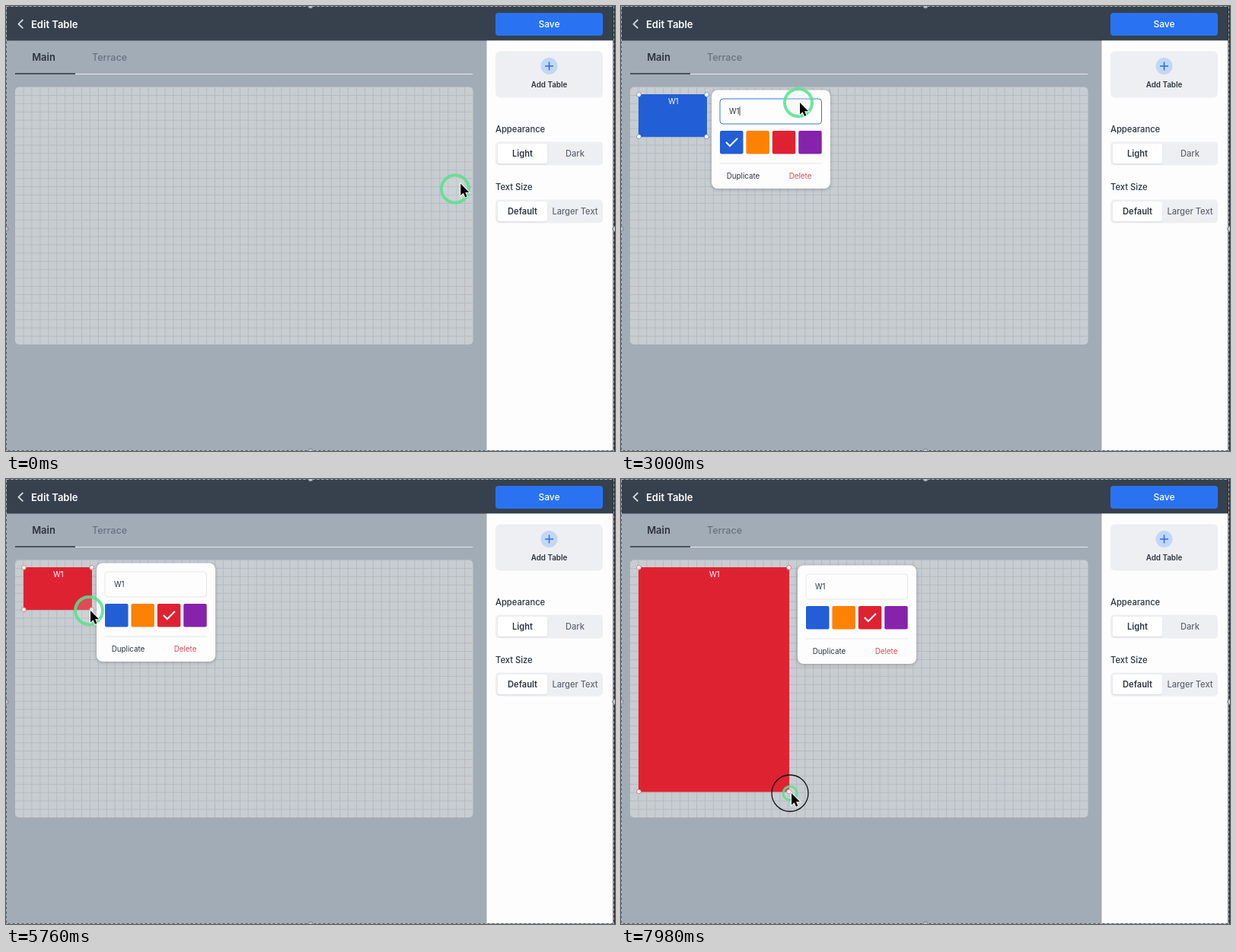
An HTML page with a canvas for the animation above (8000 ms loop, 800 by 585 pixels).

```html
<!DOCTYPE html>
<html lang="en">
<head>
<meta charset="utf-8">
<title>Edit Table</title>
<style>
html, body { margin: 0; width: 100%; height: 100%; overflow: hidden; }
canvas { display: block; width: 800px; height: 585px; }
</style>
</head>
<body>
<canvas id="stage" width="800" height="585"></canvas>
<script>
const stage = document.getElementById('stage').getContext('2d');
const layer = new OffscreenCanvas(160 + 16, 130 + 16).getContext('2d');
let ctx = stage;

const LOOP = 8000;
const BLUE = '#225ed5', ORANGE = '#fd8204', RED = '#df2232', PURPLE = '#8722ac';
const INK = '#2c333e', PALE = '#eeeff2', WHITE = '#fdfdfd';
const ARROW = new Path2D('M0 0V15.5L3.6 12.2L6 17.8L8.4 16.8L6.1 11.3H11Z');

const ADDED = 720, FOCUSED = 1860, CLEARED = 2040, RECOLORED = 4320, DRAGGED = 6000;
const clicks = [620, 1840, 4260];

const move = (from, to, x, y) => ({ from, to, x, y });
const pointerStart = { x: 581.7, y: 254 };
const pointerMoves = [
  move(-150, 560, 715, 79),        // Add Table
  move(800, 1220, 399, 170.6),
  move(1220, 1700, 235, 127),      // name field
  move(3480, 3900, 217, 170),      // red swatch
  move(4700, 5400, 111, 173),      // table corner
  move(DRAGGED, 6530, 236, 402),   // drag, overshoot, settle
  move(6530, 6850, 238, 426),
  move(6850, 7200, 224, 413)
];
const sizeStart = { x: 10, y: 6 };  // in snap steps
const sizeMoves = [move(DRAGGED + 40, 6480, 21, 30), move(6700, 7200, 22, 32)];

const clamp = v => Math.max(0, Math.min(1, v));
const ramp = (t, from, to) => clamp((t - from) / (to - from));

function travel(start, moves, t) {
  let { x, y } = start;
  for (const m of moves) {
    const u = ramp(t, m.from, m.to), eased = u * u * (3 - 2 * u);
    x += (m.x - x) * eased;
    y += (m.y - y) * eased;
  }
  return { x, y };
}

function box(x, y, w, h, r, fill, stroke) {
  ctx.beginPath();
  ctx.roundRect(x, y, w, h, r);
  ctx.fillStyle = fill;
  ctx.fill();
  if (stroke) { ctx.strokeStyle = stroke; ctx.lineWidth = 1; ctx.stroke(); }
}

function disc(x, y, r, fill, stroke, width = 1) {
  ctx.beginPath();
  ctx.arc(x, y, r, 0, 2 * Math.PI);
  ctx.fillStyle = fill;
  ctx.fill();
  if (stroke) { ctx.strokeStyle = stroke; ctx.lineWidth = width; ctx.stroke(); }
}

function line(points, color, width = 1) {
  ctx.beginPath();
  points.forEach(([x, y]) => ctx.lineTo(x, y));
  ctx.strokeStyle = color;
  ctx.lineWidth = width;
  ctx.stroke();
}

// y is the middle of the capital letters
function label(text, x, y, size, weight, color, align = 'center') {
  ctx.font = `${weight} ${size}px Inter, sans-serif`;
  ctx.textAlign = align;
  ctx.fillStyle = color;
  ctx.fillText(text, x, y + size * 0.364);
}

function shadowed(blur, alpha, draw) {
  ctx.save();
  ctx.shadowColor = `rgba(0,0,0,${alpha})`;
  ctx.shadowBlur = blur;
  ctx.shadowOffsetY = 1;
  draw();
  ctx.restore();
}

function drawGrid(x, y, w, h, columns, rows) {
  ctx.save();
  box(x, y, w, h, 5, '#c8cdd1');
  ctx.clip();
  for (let i = 1; i < columns; i++) {
    const gx = x + i * w / columns;
    line([[gx, y], [gx, y + h]], '#b5bbc1');
  }
  for (let i = 1; i < rows; i++) {
    const gy = y + i * h / rows;
    line([[x, gy], [x + w, gy]], '#b5bbc1');
  }
  ctx.restore();
}

function drawMain() {
  box(0, 0, 800, 585, 0, '#a2acb6');
  box(0, 0, 800, 45.5, 0, '#36414d');
  line([[22.3, 18], [16.5, 23.7], [22.3, 29.3]], '#d5d9de', 1.8);
  label('Edit Table', 33, 24, 13, 600, '#fff', 'left');
  label('Main', 49.5, 67.5, 12.9, 600, INK);
  label('Terrace', 136, 67.5, 12.5, 500, '#69737f');
  line([[12, 89.5], [613, 89.5]], '#e6e9ec');
  line([[12, 89], [91, 89]], '#4b555f', 2);
  drawGrid(12, 106.5, 601.5, 338.5, 55, 31);
}

function drawToggle(y, title, on, off) {
  label(title, 643, y - 16.5, 11.2, 500, INK, 'left');
  box(643, y, 141, 31, 5, PALE);
  shadowed(2, 0.08, () => box(646, y + 2.5, 65, 26, 3, '#fff'));
  label(on, 678.5, y + 15.5, 11.1, 600, INK);
  label(off, 747.5, y + 15.5, 11.1, 500, '#5d6673');
}

function drawSidebar() {
  box(631.5, 45.5, 166, 540, 0, WHITE);
  box(643, 9, 141, 30, 4, '#2973f2');
  label('Save', 713.5, 24, 12, 500, '#fff');
  box(643, 59.5, 141, 61, 6, PALE);
  disc(713.5, 79, 11, '#c2d7f7');
  line([[708, 79], [719, 79]], '#2a6be0', 1.5);
  line([[713.5, 73.5], [713.5, 84.5]], '#2a6be0', 1.5);
  label('Add Table', 713.5, 103, 9.8, 600, INK);
  drawToggle(178.5, 'Appearance', 'Light', 'Dark');
  drawToggle(254.5, 'Text Size', 'Default', 'Larger Text');
}

function drawSelectionFrame() {
  box(797.5, 0, 2.5, 585, 0, '#1c1f23');
  ctx.lineWidth = 1;
  for (const [color, dash] of [['#555d66', []], ['#b4bac0', [3, 3]]]) {
    ctx.strokeStyle = color;
    ctx.setLineDash(dash);
    ctx.strokeRect(0.5, 0.5, 798, 584);
  }
  ctx.setLineDash([]);
  for (const side of [0, 1]) {
    disc(400, side * 585, 3, '#bfc4c9', '#7e858c');
    disc(side * 799.5, 293, 3, '#bfc4c9', '#7e858c');
  }
}

function drawTable(t, color, name) {
  const x = 23.5, y = 116.5;
  const steps = travel(sizeStart, sizeMoves, t);
  const w = Math.round(steps.x) * 9 - 1, h = Math.round(steps.y) * 9.2;
  box(x, y, w, h, 0, color, color);
  label(name, x + w / 2 + 0.7, 125, 9.8, 400, '#fff');
  for (const cx of [x, x + w])
    for (const cy of [y, y + h]) disc(cx, cy, 2.9, '#fff', color, 0.6);
}

function drawPopupCard(name, focused, color) {
  shadowed(5, 0.25, () => box(0, 0, 156, 129.5, 8, WHITE));
  box(11, 11.5, 133.5, 33, 4, WHITE, focused ? '#3a78c9' : '#e5e7ea');
  label(name, 23, 28, 9.7, 400, INK, 'left');
  if (focused) {
    const caret = 23.5 + ctx.measureText(name).width;
    line([[caret, 22], [caret, 33.5]], '#333', 0.9);
  }
  [BLUE, ORANGE, RED, PURPLE].forEach((swatch, i) => {
    const x = 11 + i * 34.4;
    box(x, 53.5, 30.5, 30.5, 2, swatch);
    if (swatch === color)
      line([[x + 8, 68.5], [x + 13, 73.5], [x + 23, 63.5]], '#fff', 2);
  });
  line([[11, 96.5], [145, 96.5]], '#e3e5e8');
  label('Duplicate', 41.5, 112.5, 9.8, 400, INK);
  label('Delete', 116.5, 112.5, 9.8, 400, '#d64a55');
}

// The card fades as one flat layer
function drawPopup(x, y, alpha, ...content) {
  const margin = 8;
  ctx = layer;
  ctx.clearRect(0, 0, layer.canvas.width, layer.canvas.height);
  ctx.save();
  ctx.translate(margin, margin + 0.5);
  drawPopupCard(...content);
  ctx.restore();
  ctx = stage;
  ctx.globalAlpha = alpha;
  ctx.drawImage(layer.canvas, x - margin, y - margin);
  ctx.globalAlpha = 1;
}

function drawPointer(t) {
  const tip = travel(pointerStart, pointerMoves, t);
  const trail = travel(pointerStart, pointerMoves, t - 30);
  const clicking = clicks.map(c => Math.min(ramp(t, c, c + 60), ramp(t, c + 180, c + 120)));
  const press = Math.max(ramp(t, DRAGGED, DRAGGED + 60), ...clicking);
  disc(trail.x - 2, trail.y, 18 - 9 * press, 'rgba(222,232,226,.2)',
       'rgba(88,226,143,.85)', 4 - press);
  if (press > 0.5) disc(tip.x - 2, tip.y, 24, 'transparent', '#111', 1.3);

  ctx.save();
  ctx.translate(tip.x, tip.y);
  ctx.strokeStyle = '#fff';
  ctx.lineWidth = 1.8;
  ctx.stroke(ARROW);
  ctx.fillStyle = '#000';
  ctx.fill(ARROW);
  ctx.restore();
}

function draw(t) {
  drawMain();
  drawSidebar();
  drawSelectionFrame();

  if (t >= ADDED) {
    const typed = Math.max(0, Math.floor((t - CLEARED) / 180));
    const name = t < CLEARED ? 'Table1' : 'W1'.slice(0, typed);
    const color = t < RECOLORED ? BLUE : RED;
    const focused = t >= FOCUSED && t < RECOLORED;
    const shown = Math.min(ramp(t, ADDED, ADDED + 180), ramp(t, 6520, 6220));
    drawTable(t, color, name);
    drawPopup(119, 110, shown, name, focused, color);
    drawPopup(232, 113, ramp(t, 7400, 7600), name, focused, color);
  }
  drawPointer(t);
}

function tick() {
  draw(performance.now() % LOOP);
  requestAnimationFrame(tick);
}
tick();
</script>
</body>
</html>
```
